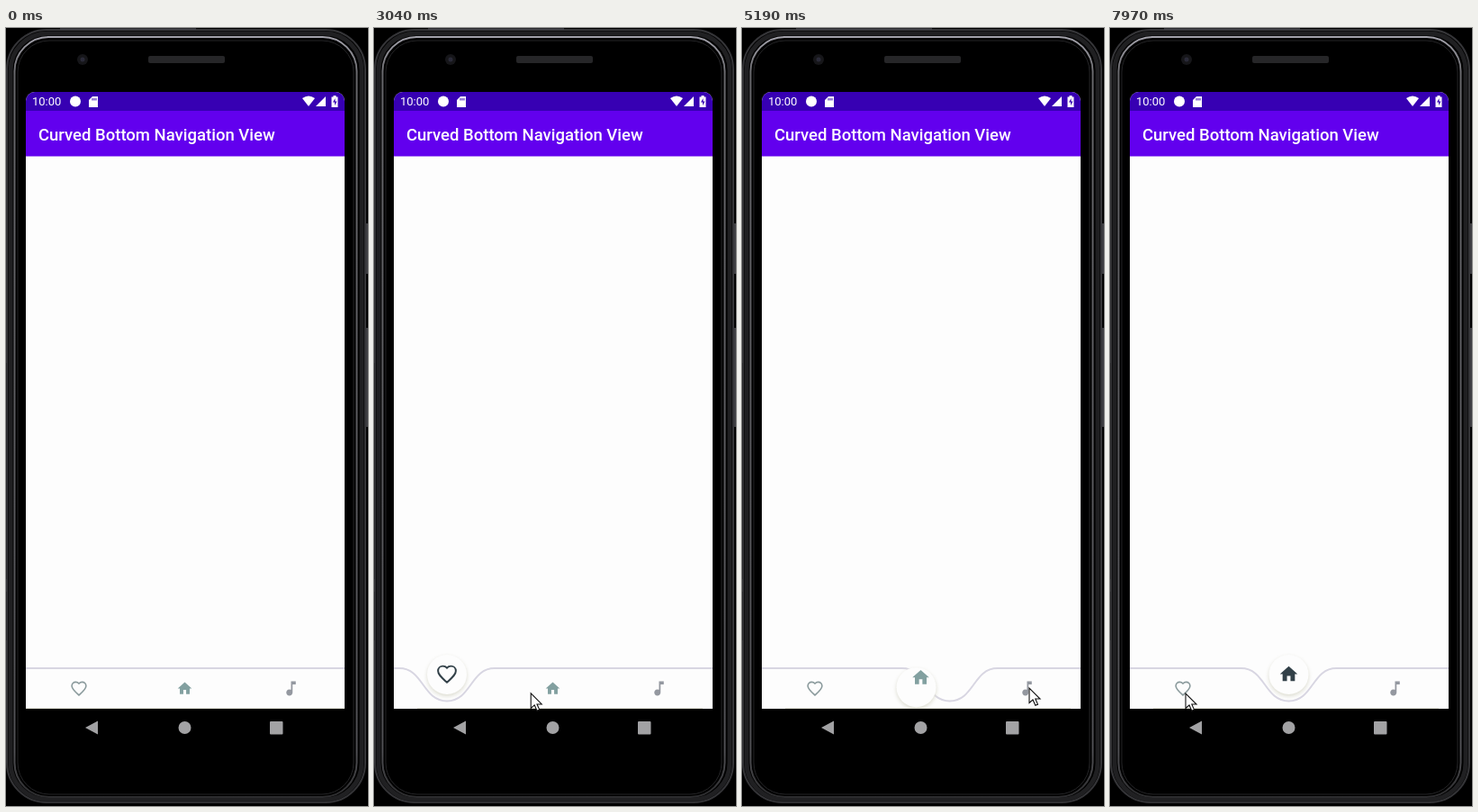
These frames come from a looping animation (402 px wide and 864 px high, 8 s). An HTML page:

```html
<!DOCTYPE html>
<html lang="en">
<head>
<meta charset="utf-8">
<title>Curved Bottom Navigation View</title>
<style>
  html, body { margin: 0; width: 100%; height: 100%; overflow: hidden; background: #000; }
  svg { display: block; width: 402px; height: 864px; }
  text { font-family: Roboto, sans-serif; fill: #fff; }
  .body { fill: none; }
  #fab { fill: #fdfdfd; filter: drop-shadow(0 2px 2px #dcdcd0); }
</style>
</head>
<body>
<svg viewBox="0 0 402 864">
  <defs>
    <clipPath id="screen"><path d="M22 756V81a10 10 0 0 1 10-10H366a10 10 0 0 1 10 10V756Z"/></clipPath>
    <linearGradient id="rim" x2="0" y2="1">
      <stop offset="0" stop-color="#a2a1aa"/>
      <stop offset=".05" stop-color="#68686c"/>
      <stop offset=".94" stop-color="#505054"/>
      <stop offset="1" stop-color="#2c2c2e"/>
    </linearGradient>
  </defs>
  <rect width="402" height="864"/>

  <g class="body">
    <rect x="1" y="2" width="398" height="858" rx="44" stroke="#353538" stroke-width="2"/>
    <rect x="5" y="6" width="390" height="851" rx="41" stroke="#202022" stroke-width="5"/>
    <rect x="9.500" y="10" width="380" height="844" rx="38" stroke="url(#rim)" stroke-width="2"/>
    <rect x="13" y="14" width="373" height="837" rx="35" stroke="#252527"/>
    <path d="M46 10H352" stroke="#a2a1aa" stroke-width="2"/>
    <path d="M60 1H211" stroke="#55545c"/>
    <path d="M401 217V273M401 333V443" stroke="#404044" stroke-width="2"/>
    <path d="M.5 372V612M.5 626V680" stroke="#2a2a2c"/>
  </g>
  <circle cx="85" cy="35" r="6" fill="#161619"/>
  <circle cx="85" cy="35" r="2.500" fill="#2a2a38"/>
  <rect x="158" y="31" width="85" height="8" rx="2" fill="#262628"/>

  <g clip-path="url(#screen)">
    <rect x="22" y="71" width="354" height="685" fill="#fdfdfd"/>
    <rect x="22" y="71" width="354" height="21" fill="#3700b3"/>
    <rect x="22" y="92" width="354" height="50.500" fill="#6200ee"/>
    <path id="base" stroke="#e6e6da"/>
    <path id="edge" fill="none" stroke="#d8d6e2" stroke-width="2"/>
    <circle id="fab" r="22"/>
  </g>

  <text x="29" y="86" font-size="13">10:00</text>
  <text x="36" y="124.500" font-size="18.500" font-weight="500">Curved Bottom Navigation View</text>
  <g fill="#fff">
    <circle cx="77" cy="81.500" r="6"/>
    <path d="M96 76h6v12H92V80Z"/>
    <path d="M329 78q7-5 14 0l-7 9Z"/>
    <path d="M355 76V87H344Z"/>
    <path d="M363.500 75h3v1.500h2V88h-7V76.500h2Z"/>
  </g>
  <path d="M96 78V80.500M98 78V80.500M100 78V80.500" stroke="#3700b3"/>
  <path d="M365.500 78l-2.500 4.500h2V86l2.500-4.500h-2Z" fill="#3700b3"/>

  <g id="icons">
    <path d="M16.500 3c-1.740 0-3.410.81-4.500 2.090C10.910 3.810 9.240 3 7.500 3 4.420 3 2 5.420 2 8.500c0 3.780 3.400 6.860 8.550 11.540L12 21.350l1.450-1.320C18.600 15.360 22 12.280 22 8.500 22 5.420 19.580 3 16.500 3z"/>
    <path d="M10 20v-6h4v6h5v-8h3L12 3 2 12h3v8z"/>
    <path d="M12 3v10.550c-.59-.34-1.270-.55-2-.55-2.210 0-4 1.790-4 4s1.790 4 4 4 4-1.790 4-4V7h4V3h-6z"/>
  </g>

  <g fill="#a2a2a4">
    <path d="M88 777L102 769.500V784.500Z"/>
    <circle cx="198.500" cy="777" r="7"/>
    <rect x="293" y="770" width="14.500" height="14.500" rx="1"/>
  </g>
  <path id="cursor" d="M0 0V16.500L4 13L6.800 19.300L9.500 18.100L6.800 12H12Z" fill="#fff" stroke="#111" stroke-width="1.100"/>
</svg>
<script>
const LOOP = 8000, TOP = 711, REST = 733.5, RISE = 16, SWITCH = 300;
const $ = id => document.getElementById(id);
const edge = $('edge'), base = $('base'), fab = $('fab'), cursor = $('cursor');

const items = [
  { x: 81, scale: .79, tint: [138, 154, 156] },
  { x: 198.5, scale: .78, tint: [130, 160, 160] },
  { x: 316.5, scale: .88, tint: [148, 152, 160] }
];
[...$('icons').children].forEach((el, i) => items[i].el = el);
const DARK = [50, 64, 72];

// start time, previous item, next item
const moves = [[2005, -1, 0], [3660, 0, 1], [5086, 1, 2], [6820, 2, 1]];
const SHOW = 2190;

// time, x, y of the pointer tip
const track = [
  [1230, -8, 708], [1890, 84, 742], [2500, 84, 742], [3290, 202, 738],
  [4250, 202, 738], [4950, 319, 733], [5600, 319, 733], [6170, 239, 745],
  [6600, 203, 742], [7200, 203, 742], [7760, 84, 742], [7840, 84, 742], [7970, 84, 739]
];

const clamp = v => Math.max(0, Math.min(1, v));
const mix = (a, b, k) => a + (b - a) * k;
const smooth = k => k * k * (3 - 2 * k);
const itemX = i => i < 0 ? -36.5 : items[i].x;

function curve(c) {
  return `M22 ${TOP}H${c - 53}C${c - 26} ${TOP} ${c - 27} 747.5 ${c} 747.5` +
    `S${c + 26} ${TOP} ${c + 53} ${TOP}H376`;
}

function drawIcon(item, lift) {
  const k = clamp((lift - .8) / .2);
  const rgb = item.tint.map((v, i) => Math.round(mix(v, DARK[i], k)));
  const y = REST - RISE * lift, s = item.scale * (1 + .25 * lift);
  const color = `rgb(${rgb})`, outline = item === items[0];
  item.el.setAttribute('transform', `translate(${item.x} ${y}) scale(${s}) translate(-12 -12)`);
  item.el.setAttribute('fill', outline ? 'none' : color);
  item.el.setAttribute('stroke', outline ? color : 'none');
  item.el.setAttribute('stroke-width', 2);
}

function drawBar(t) {
  const lifts = [0, 0, 0];
  const move = t < SHOW ? null : moves.filter(m => m[0] <= t).pop();
  fab.style.display = move ? '' : 'none';
  base.setAttribute('d', move ? 'M48 755.5H365' : 'M22 755.5H376');
  if (move) {
    const [start, from, to] = move;
    const u = clamp((t - start) / SWITCH);
    const eased = (1 - Math.cos(Math.PI * u)) / 2;
    const falling = u < .5;
    const drop = falling ? (2 * u) ** 4 : 2 - 2 * u;
    const sink = 59 * drop;
    edge.setAttribute('d', curve(mix(itemX(from), itemX(to), eased)));
    fab.setAttribute('cx', itemX(falling ? from : to) - Math.min(8, sink * .35));
    fab.setAttribute('cy', 718 + sink);
    if (!falling) lifts[to] = smooth(1 - drop);
    else if (from >= 0) lifts[from] = 1 - drop;
  } else {
    edge.setAttribute('d', `M22 ${TOP}H376`);
  }
  items.forEach((item, i) => drawIcon(item, lifts[i]));
}

function drawCursor(t) {
  cursor.style.display = t < track[0][0] ? 'none' : '';
  const next = track.findIndex(p => p[0] > t);
  const b = next < 0 ? track[track.length - 1] : track[next];
  const a = next < 1 ? b : track[next - 1];
  const k = a === b ? 0 : smooth((t - a[0]) / (b[0] - a[0]));
  cursor.setAttribute('transform', `translate(${mix(a[1], b[1], k)} ${mix(a[2], b[2], k)})`);
}

function frame() {
  const t = performance.now() % LOOP;
  drawBar(t);
  drawCursor(t);
  requestAnimationFrame(frame);
}
frame();
</script>
</body>
</html>
```
